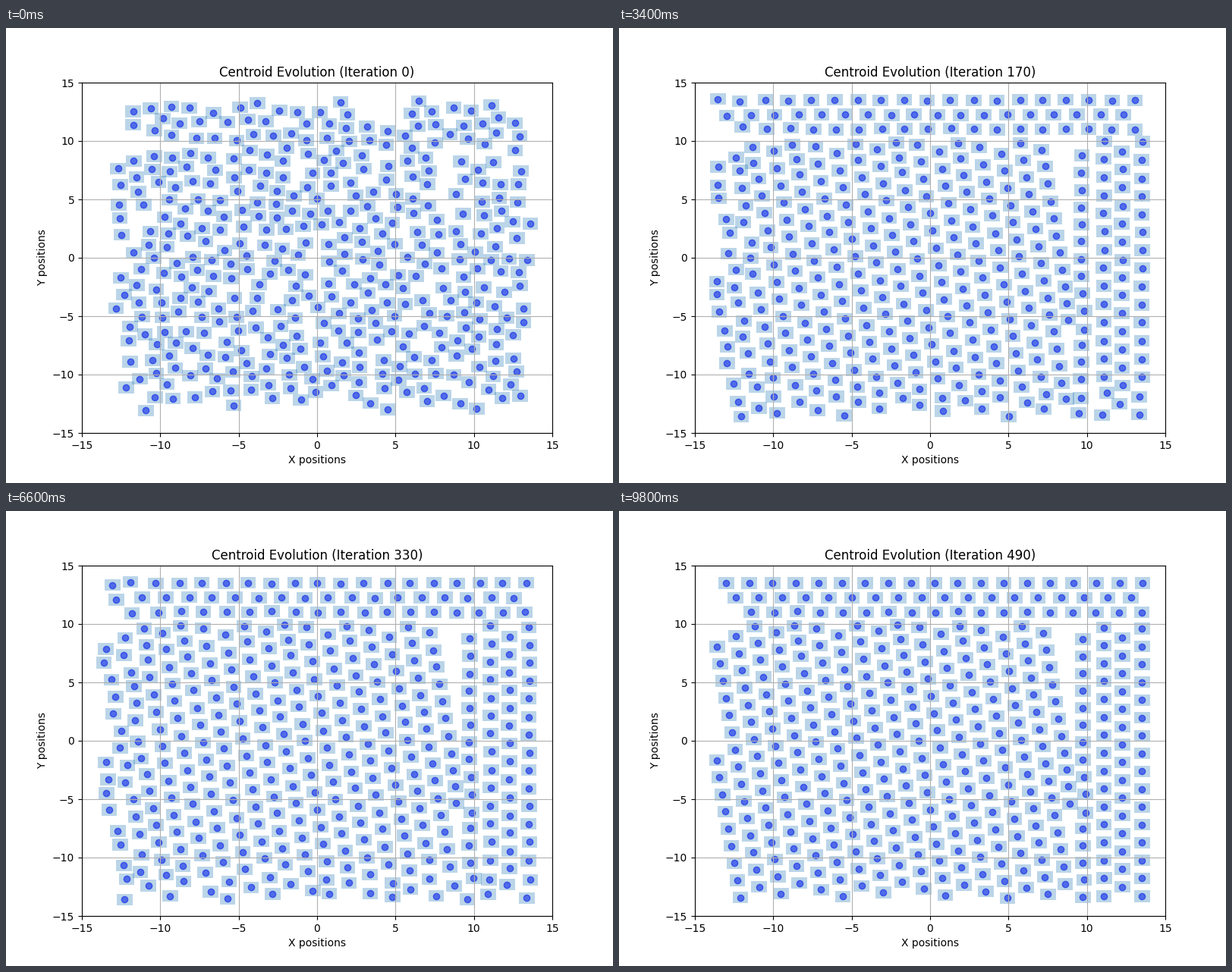
A matplotlib script for the animation above (10 s loop, 800x600 px).

```python
import itertools

import numpy as np
import matplotlib.pyplot as plt
from matplotlib.animation import FuncAnimation
from matplotlib.collections import PolyCollection

FRAMES, INTERVAL, STEP = 50, 200, 10
PITCH = 1.47
SETTLE = 1.1
WALL = 13.6
ESCAPE_Y = (4.22, 0.06, -6.04)

rng = np.random.default_rng(7)


def lattice():
    """Slanted hexagonal columns filling the middle and the left."""
    m, n = np.meshgrid(np.arange(-11, 7), np.arange(-25, 26))
    y = 0.9 + 0.9 * m + PITCH * n
    x = 0.57 + 1.31 * m - 0.13 * y
    inside = (x > -13.7) & (x < 9.25) & (y > -13.5) & (y < 10.3)
    return np.column_stack([x[inside], np.minimum(y[inside], 9.85)])


def line(start, end):
    """Evenly spaced points along a wall."""
    start, end = np.array(start), np.array(end)
    count = round(np.hypot(*(end - start)) / 1.485) + 1
    return np.linspace(start, end, count)


def spread(points, gap, rounds):
    """Push close neighbours apart until they keep the gap."""
    for _ in range(rounds):
        diff = points[:, None] - points[None]
        dist = np.hypot(diff[..., 0], diff[..., 1])
        np.fill_diagonal(dist, 9)
        push = np.clip(gap - dist, 0, None) / np.maximum(dist, 0.05)
        points = points + 0.3 * (push[..., None] * diff).sum(axis=1)
        points = np.clip(points, -WALL, WALL)
    return points


def clear(points, x, y, radius):
    """Move points out of a round empty spot."""
    away = points - (x, y)
    dist = np.maximum(np.hypot(*away.T), 0.1)
    return points + away * (np.clip(radius - dist, 0, None) / dist)[:, None]


layout = spread(np.vstack([
    lattice(),
    line((13.55, 13.5), (-13.0, 13.5)),
    line((12.8, 12.25), (-12.4, 12.25)),
    line((13.5, 11.0), (-11.4, 11.0)),
    line((9.75, 8.7), (9.75, -13.4)),
    line((11.08, 9.7), (11.08, -13.3)),
    line((12.25, 8.8), (12.25, -12.5)),
    line((13.52, 9.6), (13.52, -13.3)),
]), 1.27, 30)

count = len(layout)
top = layout[:, 1] > 10.4
side = (layout[:, 0] > 10.4) & ~top
core = ~top & ~side

# The first state: squeezed, shaken, with empty corners and gaps.
escaped = np.column_stack([np.full(3, 15.48), ESCAPE_Y])
start = np.vstack([layout, escaped * (0.87, 0.95)]) * 0.94
start += rng.normal(0, 0.32, start.shape)
for sx, sy in itertools.product((-14, 14), repeat=2):
    start = clear(start, sx, sy, 3)
for spot in ((1.2, -13, 2.2), (4, 13, 2.4), (-13.5, 0.5, 1.8)):
    start = clear(start, *spot)
start = spread(start, 1.15, 40)

loose = (layout[:, 0] < -11) | (layout[:, 1] < -11.5)
swing = np.where(loose, 0.18, 0.03)[:, None] * rng.choice([-1, 1], (count, 2))
rate = rng.uniform(0.05, 0.16, (count, 2))


def positions(frame):
    left = 1 - frame / (FRAMES - 1)
    early = np.exp(-frame / 10)
    x, y = layout.T

    dx = -0.7 * left * top - 0.6 * early * core
    dy = 0.02 * left * (y + 13.5) * side + early * (0.06 * x - 0.3) * core
    pts = layout + np.column_stack([dx, dy])
    pts = pts + swing * np.sin(rate * (FRAMES - 1 - frame))
    pts = np.vstack([np.clip(pts, -WALL, WALL), escaped])
    return pts + (start - pts) * np.exp(-frame / SETTLE)


CORNERS = np.array([(-0.5, -0.5), (0.5, -0.5), (0.5, 0.5), (-0.5, 0.5)])


def boxes(pts):
    return pts[:, None] + CORNERS


fig, ax = plt.subplots(figsize=(8, 6), dpi=100)
ax.set_xlim(-15, 15)
ax.set_ylim(-15, 15)
ax.set_xlabel("X positions")
ax.set_ylabel("Y positions")
ax.grid(True)
title = ax.set_title("Centroid Evolution (Iteration 0)")

# The translucent squares lie over the dots and soften their blue.
dots = ax.scatter(*start.T, c="blue", alpha=0.6)
squares = PolyCollection(boxes(start), facecolors="tab:blue",
                         edgecolors="none", linewidths=0, alpha=0.3)
ax.add_collection(squares, autolim=False)
ax.set_xlim(-15, 15)
ax.set_ylim(-15, 15)


def update(frame):
    pts = positions(frame)
    dots.set_offsets(pts)
    squares.set_verts(boxes(pts))
    title.set_text(f"Centroid Evolution (Iteration {frame * STEP})")
    return dots, squares, title


anim = FuncAnimation(fig, update, frames=FRAMES, interval=INTERVAL,
                     repeat=True, repeat_delay=0, blit=False)
plt.show()
```
